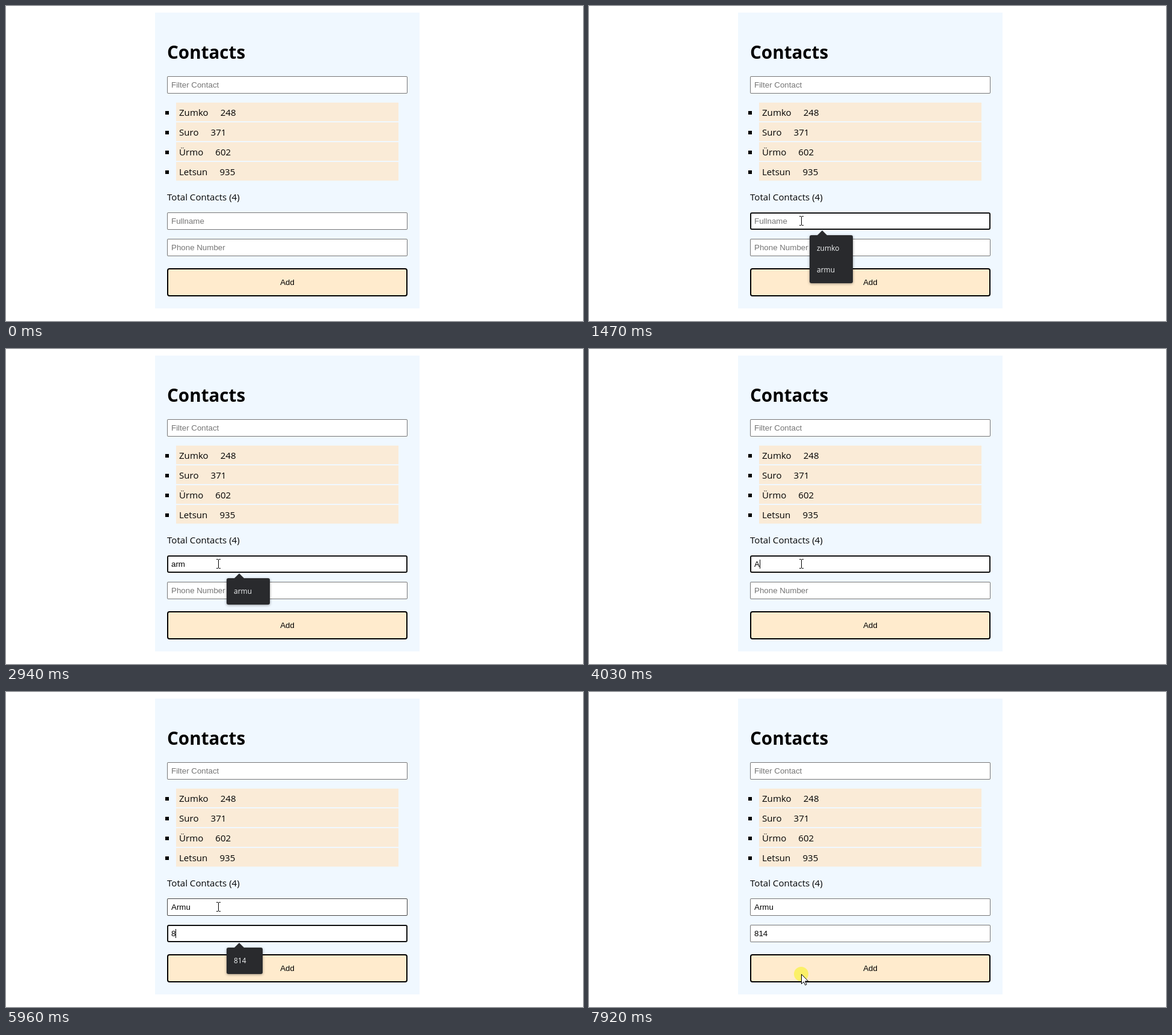
An HTML page for the animation above (8000 ms loop, 960 by 525 pixels).

```html
<!DOCTYPE html>
<html lang="en">
<head>
<meta charset="utf-8">
<title>Contacts</title>
<style>
  html, body { margin: 0; width: 100%; height: 100%; overflow: hidden; background: white; }
  body { position: relative; font: 15.1px/20px "Open Sans", sans-serif; color: black; }
  body * { box-sizing: border-box; }
  .card, h1, .row, .total, .field, .add, .menu, svg { position: absolute; }
  .card { left: 248px; top: 11px; width: 440px; height: 493px; background: aliceblue; }
  h1 { left: 268px; top: 56px; margin: 0; font-size: 29.6px; line-height: 41px; font-weight: 700; }
  .row { left: 283px; width: 370px; height: 31px; padding-left: 5px; line-height: 32px; background: antiquewhite; }
  .row::before { content: ""; position: absolute; left: -18px; top: 14px; width: 6px; height: 6px; background: black; }
  .row span { margin-left: 20px; }
  .total { left: 268px; top: 308px; }
  .field, .add { left: 268px; width: 400px; font: 13.333px "Liberation Sans", Arial, sans-serif; }
  .field { height: 29px; padding-left: 7px; line-height: 29px; background: white; white-space: pre;
    border-radius: 2px; box-shadow: inset 0 0 0 1px #767676; }
  .field.left { box-shadow: inset 0 0 0 1px #444; }
  .field.focus { border-radius: 3px; box-shadow: inset 0 0 0 2px #101010; }
  .hint { position: absolute; left: 7px; color: #757575; }
  .caret { position: absolute; top: 7px; width: 1px; height: 15px; background: black; }
  .add { top: 437px; height: 47px; line-height: 43px; text-align: center;
    background: blanchedalmond; border: 2px solid black; border-radius: 4px; }
  .menu { left: 367px; padding: 4px 0; background: #292a2d; border-radius: 3px; color: #f1f3f4;
    font-size: 12px; line-height: 36px; box-shadow: 0 1px 4px rgba(0, 0, 0, .4); }
  .menu::before { content: ""; position: absolute; left: 13px; top: -8px;
    border: solid transparent; border-width: 0 8.5px 8px; border-bottom-color: #292a2d; }
  .menu div { height: 36px; padding-left: 12px; }
  svg { left: 0; top: 0; overflow: visible; }
</style>
</head>
<body>
<div class="card"></div>
<h1>Contacts</h1>
<div class="total">Total Contacts (4)</div>
<div class="add">Add</div>
<div class="menu"></div>
<svg width="1" height="1">
  <g id="pointer">
    <circle r="12" fill="#fbf05a" fill-opacity=".88"/>
    <path id="beam" d="M-3 -7.5h3M1 -7.5h3M-3 7.5h3M1 7.5h3M.5 -7V7" fill="none" stroke="black" shape-rendering="crispEdges"/>
    <path id="arrow" d="M.5 .5V16.5L4.2 13L6.7 18.5L9 17.5L6.6 12H11.7Z" fill="white" stroke="black"/>
  </g>
</svg>
<script>
const LOOP = 8e3, TICK = 200 / 3;
const $ = selector => document.querySelector(selector);

function add(className, top, html) {
  const node = document.createElement('div');
  node.className = className;
  node.style.top = top + 'px';
  node.innerHTML = html;
  document.body.insertBefore(node, $('.menu'));
  return node;
}

[['Zumko', 248], ['Suro', 371], ['Ürmo', 602], ['Letsun', 935]].forEach(([name, phone], i) =>
  add('row', 161 + 33 * i, `${name}<span>${phone}</span>`));

function addField(top, hint) {
  const node = add('field', top, `<span class="hint">${hint}</span><span class="text"></span><i class="caret"></i>`);
  const [label, text, caret] = node.children;
  return (value, focused, caretOn, left) => {
    node.className = 'field' + (focused ? ' focus' : left ? ' left' : '');
    label.hidden = value !== '';
    text.textContent = value;
    caret.hidden = !(focused && caretOn);
  };
}
addField(117, 'Filter Contact')('');
const drawName = addField(344, 'Fullname');
const drawPhone = addField(388, 'Phone Number');

const start = { name: '', phone: '', focus: '', caret: 0, left: 0, items: '', menu: 0, click: 0 };
const steps = [
  [860, { focus: 'name', caret: 1, click: 1 }],
  [930, { click: 0, items: 'zumko armu', menu: 1 }],
  [1470, { caret: 0 }],
  [1930, { name: 'a', caret: 1 }],
  [2000, { items: 'armu', menu: .7 }],
  [2070, { menu: 1 }],
  [2270, { name: 'ar' }],
  [2340, { menu: .8 }],
  [2400, { menu: .9 }],
  [2470, { menu: 1 }],
  [2800, { name: 'arm', caret: 0, menu: .8 }],
  [2870, { menu: .9 }],
  [2940, { menu: 1 }],
  [3070, { caret: 1 }],
  [3270, { name: 'ar' }],
  [3330, { name: 'a' }],
  [3400, { name: '', menu: .8 }],
  [3470, { menu: .5 }],
  [3540, { menu: .2 }],
  [3620, { menu: 0 }],
  [3900, { caret: 0 }],
  [4030, { name: 'A', caret: 1 }],
  [4100, { menu: 1 }],
  [4300, { name: 'Arm', caret: 0 }],
  [4370, { name: 'Armu' }],
  [4900, { focus: 'phone', caret: 1, left: 1, menu: .92 }],
  [4970, { menu: .6 }],
  [5040, { menu: .25 }],
  [5100, { menu: 0 }],
  [5430, { caret: 0 }],
  [5960, { phone: '8', caret: 1, items: '814', menu: 1 }],
  [6090, { phone: '81' }],
  [6230, { phone: '814', menu: .8 }],
  [6300, { menu: .5 }],
  [6370, { menu: .2 }],
  [6430, { menu: 0 }],
  [6760, { caret: 0 }],
  [7310, { caret: 1 }],
  [7850, { focus: '', left: 0, click: 1 }]
];

const stateAt = t => Object.assign({}, start, ...steps.filter(s => s[0] <= t).map(s => s[1]));

function progress(t, from, to) {
  const held = Math.floor(t / TICK + .1) * TICK;
  const p = Math.min(1, Math.max(0, (held - from) / (to - from)));
  return p * p * (3 - 2 * p);
}

function drawMenu({ items, menu, focus }) {
  const node = $('.menu'), inPhone = focus === 'phone' && items === '814';
  node.style.top = (inPhone ? 426 : 382) + 'px';
  node.style.width = (inPhone ? 60 : 72) + 'px';
  node.style.opacity = menu;
  const html = items.split(' ').map(item => `<div>${item}</div>`).join('');
  if (node.innerHTML !== html) node.innerHTML = html;
}

function drawPointer(t, click) {
  const enter = progress(t, 66, 460), leave = progress(t, 7330, 7780);
  const x = Math.round(264 + 89 * enter);
  const y = Math.round(473 - 115 * enter + 112 * leave);
  const overField = x >= 268 && (y >= 344 && y < 373 || y >= 388 && y < 417);
  $('#pointer').setAttribute('transform', `translate(${x} ${y})`);
  $('#pointer').style.display = t < 70 ? 'none' : '';
  $('#beam').style.display = overField ? '' : 'none';
  $('#arrow').style.display = overField ? 'none' : '';
  $('circle').style.display = click ? '' : 'none';
}

function draw(now) {
  const t = now % LOOP, s = stateAt(t);
  drawName(s.name, s.focus === 'name', s.caret, s.left);
  drawPhone(s.phone, s.focus === 'phone', s.caret);
  drawMenu(s);
  drawPointer(t, s.click);
}

const begin = performance.now();
function frame() {
  draw(performance.now() - begin);
  requestAnimationFrame(frame);
}
frame();
</script>
</body>
</html>
```
